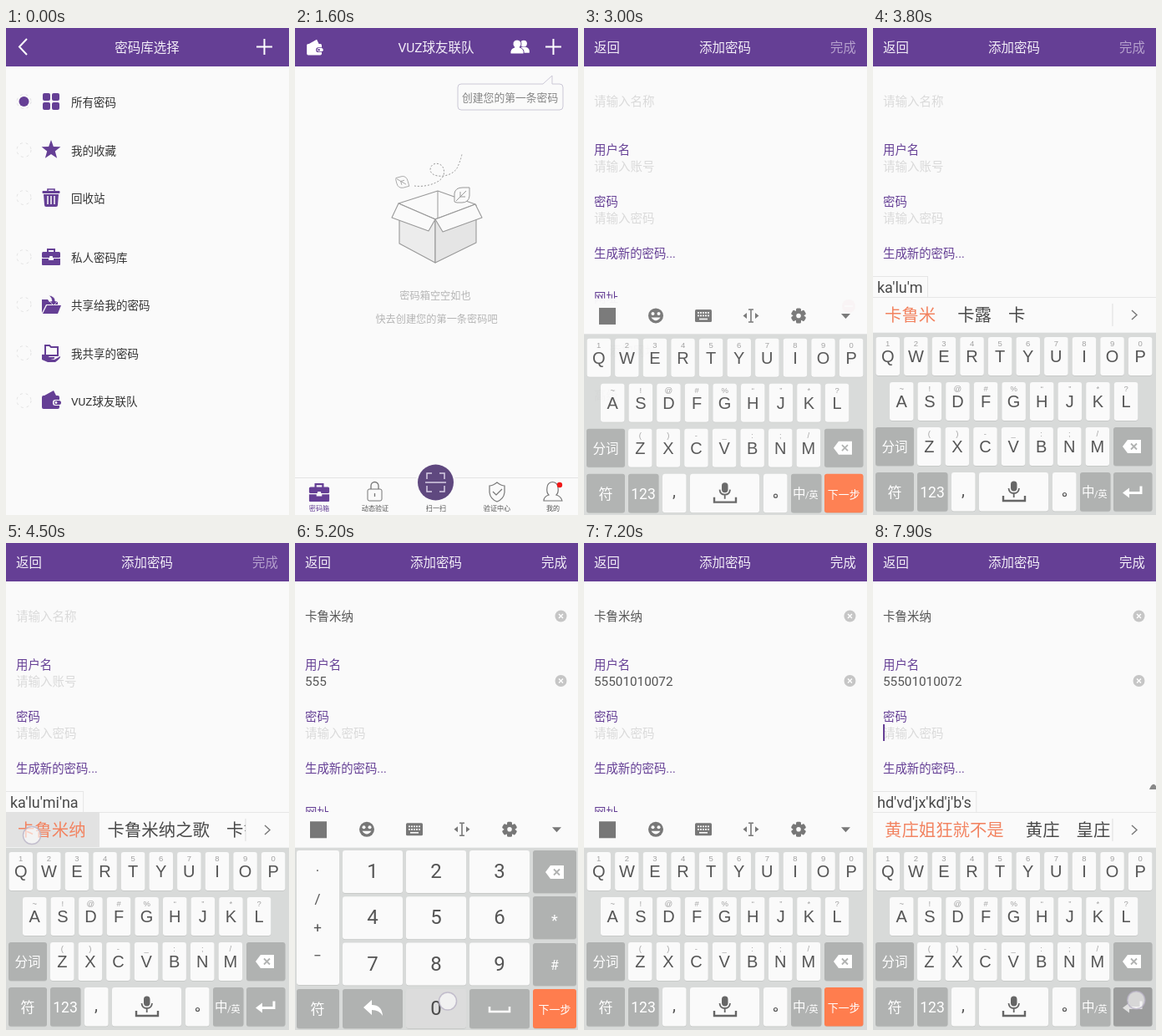
Animation of 339x583 px, one loop 8 s. Source, as an HTML page:

```html
<!DOCTYPE html>
<html lang="zh-CN">
<head>
<meta charset="utf-8">
<title>密码库</title>
<style>
html, body { margin: 0; width: 100%; height: 100%; overflow: hidden; background: #fafafa; }
svg { display: block; width: 100vw; height: 100vh; }
text { font-family: Roboto, "Noto Sans CJK SC", sans-serif; white-space: pre; }
.caps text { font-family: "Liberation Sans", sans-serif; }
</style>
</head>
<body>
<svg id="stage" viewBox="0 0 339 583"></svg>
<script>
const LOOP = 8000, STEP = 100;
const PURPLE = '#653f95', PAPER = '#fafafa', INK = '#555', GREY = '#b0b2b1', ORANGE = '#ff7d4e';
const TEAM = 'VUZ球友联队', NAME = '卡鲁米纳', ACCOUNT = '55501010072';

const clamp = v => Math.max(0, Math.min(1, v));
const easeOut = p => 1 - (1 - p) ** 2;

// Text is placed by its vertical centre.
const text = (x, y, str, size, fill, anchor = 'start') =>
  `<text x="${x}" y="${y + size * .38}" font-size="${size}" fill="${fill}" text-anchor="${anchor}">${str}</text>`;
const mid = (x, y, str, size, fill) => text(x, y, str, size, fill, 'middle');
const rect = (x, y, w, h, fill, r = 0, extra = '') =>
  `<rect x="${x}" y="${y}" width="${w}" height="${h}" rx="${r}" fill="${fill}" ${extra}/>`;
const circle = (x, y, r, fill, extra = '') => `<circle cx="${x}" cy="${y}" r="${r}" fill="${fill}" ${extra}/>`;
const shape = (d, fill, extra = '') => `<path d="${d}" fill="${fill}" ${extra}/>`;
const line = (d, stroke, w = 1, extra = '') =>
  `<path d="${d}" fill="none" stroke="${stroke}" stroke-width="${w}" ${extra}/>`;
const at = (x, y, body, extra = '') => `<g transform="translate(${x} ${y}) ${extra}">${body}</g>`;
const header = title => rect(0, 0, 339, 46, PURPLE) + mid(169, 23, title, 15.5, '#f3eef8');
const plus = line('M300 22.5H319M309.5 13V32', '#fff', 2);

const ruler = document.createElement('canvas').getContext('2d');
const textWidth = (str, size) => {
  ruler.font = `${size}px Roboto, sans-serif`;
  return ruler.measureText(str).width;
};

const icon = {
  grid: c => [[-10, -10], [1, -10], [-10, 1], [1, 1]].map(([x, y]) => rect(x, y, 9, 9, c, 2)).join(''),
  star: c => {
    const points = Array.from({ length: 10 }, (_, i) => {
      const r = i % 2 ? 5 : 12, a = i * Math.PI / 5;
      return `${(r * Math.sin(a)).toFixed(1)},${(-r * Math.cos(a)).toFixed(1)}`;
    });
    return `<polygon points="${points.join(' ')}" fill="${c}"/>`;
  },
  bin: c => line('M-4-7V-10H4V-7', c, 1.6) + rect(-10.5, -8, 21, 3, c, 1) +
    shape('M-9-4H9L8 9Q8 11 6 11H-6Q-8 11-8 9Z', c) + line('M-4-2V8M0-2V8M4-2V8', PAPER, 1.5),
  bag: c => line('M-4-5V-9H4V-5', c, 2) + rect(-11, -6, 22, 7, c, 1.5) +
    shape('M-11 2H-3V4H3V2H11V9Q11 10 10 10H-10Q-11 10-11 9Z', c) + rect(-2, -1, 4, 4, PAPER, 1),
  shared: c => shape('M-11 10V-6H-4L-2-3H8V0H-6Z', c) + shape('M-5 1H12L8 11H-10Z', c) +
    shape('M-3-11Q5-10 5-4H8L3 1-2-4H1Q1-8-3-11Z', c, `stroke="${PAPER}" stroke-width=".7"`),
  give: c => line('M-7 3V-9H-2L0-7H8V3Z', c, 2) +
    shape('M-11 2Q-6 1-2 5H4Q5 7 2 7H-1L4 8 11 4Q12 6 5 11H-4L-11 8Z', c),
  wallet: (c, hole = PAPER) => shape('M-8-6L3-12 6-6Z', c) + rect(-11, -6, 21, 16, c, 2) +
    rect(2, -1, 10, 7, hole, 3) + rect(3.5, 0, 8.5, 5, c, 2.5) + circle(6, 2.5, 1.4, hole),
};

const rows = [
  [88, 'grid', '所有密码'], [146, 'star', '我的收藏'], [203, 'bin', '回收站'], [274, 'bag', '私人密码库'],
  [331, 'shared', '共享给我的密码'], [389, 'give', '我共享的密码'], [446, 'wallet', TEAM],
];
const listPage = rect(0, 0, 339, 583, PAPER) + header('密码库选择') + plus +
  line('M25 13L16 22.5 25 32', '#fff', 2) + circle(21.5, 88, 6, PURPLE) +
  rows.map(([y, name, label]) =>
    circle(21.5, y, 8.5, 'none', 'stroke="#dcdcdc" stroke-width=".8" stroke-dasharray="3 4"') +
    at(54, y, icon[name](PURPLE)) + text(78, y + .5, label, 13.5, '#333')).join('');

const person = c => circle(0, -4, 4.6, c) + shape('M-8 9Q-9 3-3 1H3Q9 3 8 9Z', c);
const leaf = shape('M-9 8V-2Q-8-9 1-9H9V1Q8 9 0 9H-6Z', PAPER, 'stroke="#999"') +
  line('M-7 7L5-5M-2 2V-4M-2 2H4', '#999');
const tabs = [[29, '密码箱', PURPLE], [96, '动态验证', INK], [169, '扫一扫', INK], [242, '验证中心', INK], [309, '我的', INK]];
const mainPage = rect(0, 0, 339, 583, PAPER) + header(TEAM) + plus +
  at(23.5, 24, icon.wallet('#fff', PURPLE), 'scale(.85)') +
  at(274, 22, person('#fff'), 'scale(.85)') +
  at(266, 22, shape('M-8 9Q-9 3-3 1A5 5 0 1 1 3 1Q9 3 8 9Z', '#fff', `stroke="${PURPLE}"`)) +
  shape('M199 67H297L308 57V67H317Q321 67 321 71V94Q321 98 317 98H199Q195 98 195 94V71Q195 67 199 67Z',
    PAPER, 'stroke="#cbc8d6"') +
  text(200, 83, '创建您的第一条密码', 12.8, '#858585') +
  `<g stroke="#999" stroke-width="1.1" stroke-linejoin="round">` +
  shape('M124 210L171 195 216 211 168 229Z', PAPER) + line('M171 195V228', '#999') +
  shape('M125 212L168 229V281L125 258Z', '#ececec') + shape('M168 229L217 212V257L168 281Z', '#e5e5e5') +
  shape('M124 210L116 227 160 243 168 229Z', PAPER) + shape('M168 229L177 244 224 227 216 211Z', PAPER) + '</g>' +
  line('M143 189C155 191 175 186 178 176C182 160 162 158 162 170C163 180 186 180 194 168Q198 160 200 151',
    '#999', 1, 'stroke-dasharray="2 2"') +
  at(128.5, 184.5, leaf, 'rotate(75) scale(.75)') + at(200, 200, leaf) +
  mid(168, 320, '密码箱空空如也', 12.2, '#b5b5b5') + mid(169.5, 348, '快去创建您的第一条密码吧', 12.2, '#b5b5b5') +
  line('M0 538.5H339', '#e4e4e4') + circle(168.5, 545, 24, PAPER) + circle(168.5, 544, 21.5, '#5f487f') +
  line('M158 540V533H164M173 533H179V540M179 548V555H173M164 555H158V548M156 544H181', '#d8cde5', 1.5) +
  at(29, 556, icon.bag(PURPLE), 'scale(1.1)') +
  rect(87, 552, 17, 14, 'none', 2, 'stroke="#777"') + line('M91 552V548A4.5 4.5 0 0 1 100 548V552M95.5 557V561', '#777', 1.3) +
  line('M242 544Q247 548 251 548V556Q250 564 242 567Q234 564 233 556V548Q237 548 242 544ZM237 555L241 559 248 552', '#777', 1.2) +
  line('M298 566Q298 561 304 559Q301 556 302 550A6.5 6.5 0 0 1 315 550Q316 556 313 559Q319 561 320 566Z', '#777', 1.2) +
  circle(317, 547, 3.2, '#f01818') + tabs.map(([x, label, c]) => mid(x, 575, label, 8.1, c)).join('');

const clearMark = y => circle(318.5, y, 7, '#c6c6c6') + line(`M316 ${y - 2.5}l5 5m0-5l-5 5`, '#fff', 1.4);
const field = (y, value, hint, size = 14.5) =>
  text(12, y, value || hint, value ? size : 14.5, value ? INK : '#dadada') + (value ? clearMark(y) : '');
const formPage = (name, account) => rect(0, 0, 339, 583, PAPER) + header('添加密码') +
  text(12, 23, '返回', 15.4, '#f3eef8') + text(295, 23, '完成', 15.4, name ? '#f3eef8' : '#b5a0cd') +
  field(87.5, name, '请输入名称') + text(12, 145.3, '用户名', 14.4, PURPLE) + field(165, account, '请输入账号', 15.3) +
  text(12, 207.3, '密码', 14.4, PURPLE) + field(227.3, '', '请输入密码') +
  text(12, 269.3, '生成新的密码...', 14.4, PURPLE) + text(12, 323, '网址', 14.4, PURPLE) +
  circle(317, 333, 8, '#f0606c') + line('M312 333H322', '#fff', 2) +
  text(30, 387, '添加网址', 14.4, '#999') + text(12, 440, '高级', 14.4, '#999');

// Keyboard geometry
const qwerty = {};
[['QWERTYUIOP', '1234567890', 3.5, 370], ['ASDFGHJKL', '~!@#%“”*?', 20, 424], ['ZXCVBNM', '()-_:;/', 53, 478]]
  .forEach(([letters, hints, x, y]) => [...letters].forEach((k, i) =>
    qwerty[k] = { x: x + 33.6 * i, y, w: 28.5, h: 46, hint: hints[i] }));
const nextKey = { x: 288, y: 532, w: 46.5, h: 46.5 };
const padNext = { x: 285, y: 534, w: 52, h: 47 };
const pad = { 0: { x: 133, y: 534, w: 72, h: 47 } };
for (let n = 1; n < 10; n++)
  pad[n] = { x: 57 + 76 * ((n - 1) % 3), y: 368 + 55.3 * Math.floor((n - 1) / 3), w: 72, h: 51 };

const keyCap = (k, fill = PAPER) => rect(k.x, k.y + .7, k.w, k.h, '#c3c5c4', 3) + rect(k.x, k.y, k.w, k.h, fill, 3);
const box = (x, y, w, h) => ({ x, y, w, h });
const backspace = (x, y) => at(x, y, shape('M-11 0L-5-8H11V8H-5Z', '#fff') + line('M-1-3.5l7 7m0-7l-7 7', GREY, 1.8));
const keyboardBase = rect(0, 364.5, 339, 240, '#d8dad9');

const letterKeys = Object.entries(qwerty).map(([name, k]) => {
  const cx = k.x + k.w / 2;
  return keyCap(k) + mid(cx, k.y + 7.8, k.hint, 9.5, '#a2a2a2') + mid(cx, k.y + 22.8, name, 20, INK);
}).join('');
const letterBoard = keyboardBase + `<g class="caps">${letterKeys}</g>` +
  keyCap(box(3, 478, 46, 46), GREY) + mid(26, 501.5, '分词', 15.5, '#fff') +
  keyCap(box(288, 478, 46.5, 46), GREY) + backspace(310, 501) +
  keyCap(box(3, 532, 46, 46.5), GREY) + mid(26, 555.5, '符', 17, '#fff') +
  keyCap(box(53, 532, 36.5, 46.5), GREY) + mid(71, 555.5, '123', 17.5, '#fff') +
  keyCap(box(94, 532, 28.5, 46.5)) + mid(108, 552, ',', 20, INK) +
  keyCap(box(127, 532, 83, 46.5)) + rect(165, 542.5, 7.5, 12, '#666', 3.7) +
  line('M162.5 551Q163 557 168.7 557T175 551M168.7 557V562', '#666', 1.8) + line('M156 560V566H182V560', '#666', 2.4) +
  keyCap(box(215, 532, 28.5, 46.5)) + circle(229.5, 558.5, 2, 'none', `stroke="${INK}" stroke-width="1.2"`) +
  keyCap(box(248, 532, 36.5, 46.5), GREY) + text(250, 555.5, '中', 15.5, '#fff') + text(265, 557.5, '/英', 11, '#fff');

const numberBoard = keyboardBase + keyCap(box(2, 368, 51, 161)) +
  ['·', '/', '+', '−'].map((s, i) => mid(27, 392 + 34 * i, s, 17, INK)).join('') +
  Object.entries(pad).map(([n, k]) => keyCap(k) + mid(k.x + 36, k.y + k.h / 2 - 1.5, n, 24, INK)).join('') +
  keyCap(box(285, 368, 52, 51), GREY) + backspace(311, 394) +
  keyCap(box(285, 423, 52, 51), GREY) + mid(311, 451, '*', 18, '#fff') +
  keyCap(box(285, 479, 52, 51), GREY) + mid(311, 505, '#', 16, '#fff') +
  keyCap(box(2, 534, 51, 47), GREY) + mid(27, 558, '符', 17, '#fff') +
  keyCap(box(57, 534, 72, 47), GREY) + shape('M82 556L92 547V553Q104 553 105 566Q101 559 92 559V565Z', '#fff') +
  keyCap(box(209, 534, 72, 47), GREY) + line('M233 555V561H257V555', '#fff', 2.5);

const nextCap = k => keyCap(k, ORANGE) + mid(k.x + k.w / 2, k.y + 24, '下一步', 13, '#fff');
const enterCap = keyCap(nextKey, GREY) + line('M321 548.5V556.5H304', '#fff', 3) + shape('M299 556.5L307 550.5V562.5Z', '#fff');

const gear = Array.from({ length: 6 }, (_, i) => rect(-3, -9, 6, 6, '#777', 1.5, `transform="rotate(${i * 60})"`)).join('');
const tools = rect(18, 334, 20, 20, '#777') +
  circle(86, 343.5, 9, '#777') + circle(82.5, 341, 2, PAPER) + circle(89.5, 341, 2, PAPER) + shape('M80.5 345.5H91.5Q86 353 80.5 345.5Z', PAPER) +
  rect(133, 336, 20, 15, '#777', 1.5) + line('M136 340H150M136 343.5H150', PAPER, 1.8, 'stroke-dasharray="2 1"') + line('M138 347.5H148', PAPER, 1.6) +
  line('M197 336H203M200 336V351M197 351H203', '#777', 1.6) + shape('M195 340V347L190.5 343.5ZM205 340V347L209.5 343.5Z', '#777') +
  at(257, 343.5, gear + circle(0, 0, 6.5, '#777') + circle(0, 0, 2.8, PAPER)) + shape('M308 341H319L313.5 347Z', '#777');
const toolbar = rect(0, 322, 339, 42.5, PAPER) + at(0, -.7, tools);

function candidateBar(pinyin, words, pressed) {
  const size = 20.4, pinyinSize = 18;
  let x = 14, list = '';
  words.forEach((word, i) => {
    list += text(x, 343.5, word, size, i ? '#484848' : '#f28360');
    x += word.length * size + (i ? 20 : 26);
  });
  return rect(0, 322, 339, 42.5, PAPER) + line('M0 322.5H339', '#e6e6e6') +
    rect(-1, 297.5, 12 + textWidth(pinyin, pinyinSize), 25, PAPER, 0, 'stroke="#e6e6e6"') +
    text(5, 310.5, pinyin, pinyinSize, '#484848') +
    (pressed ? rect(0, 322, 112, 42, '#e2e2e2') : '') +
    `<svg x="0" y="322" width="287" height="43" viewBox="0 322 287 43">${list}</svg>` +
    line('M287 330V357', '#ddd') + line('M310 338L316 343.5 310 349', '#777', 1.4);
}

// Touches: time, position, pressed key, duration
const taps = [];
const tap = (t, x, y, key, ms = 100) => taps.push({ t, x, y, key, ms });
const tapKey = (t, k, dx = 5, dy = -7, ms = 100) => tap(t, k.x + k.w / 2 + dx, k.y + k.h / 2 + dy, k, ms);

const nameEntry = {
  start: 3100, gap: 150, end: 4600, pinyin: "ka'lu'mi'na", word: NAME,
  more: [['咖', '喀'], ['卡路', '卡'], ['卡露', '卡'], [NAME + '之歌', '卡鲁']],
};
const secretEntry = {
  start: 7250, gap: 50, end: LOOP, pinyin: "hd'vd'jx'kd'j'b's", word: '黄庄姐狂就不是',
  more: [['好的', '活动'], ['黄庄', '皇庄']],
};
for (const e of [nameEntry, secretEntry])
  [...e.pinyin.replace(/'/g, '')].forEach((c, i) => tapKey(e.start + i * e.gap, qwerty[c.toUpperCase()]));
const digitTime = i => i < 9 ? 4900 + 100 * i : i === 9 ? 5800 : 6200;
tap(500, 167, 443);
tap(1800, 311, 23, null, 200);
tap(4400, 31, 350, null, 200);
tapKey(4700, nextKey);
[...ACCOUNT].forEach((n, i) => tapKey(digitTime(i), pad[n], 14, -9));
tapKey(6700, padNext);
tapKey(7800, nextKey, 4, -8, 200);

function composing(e, t) {
  if (t < e.start || t >= e.end) return '';
  const count = Math.floor((t - e.start) / e.gap) + 1;
  let letters = 0, typed = '';
  for (const c of e.pinyin) {
    if (c !== "'" && ++letters > count) break;
    typed += c;
  }
  typed = typed.replace(/'$/, '');
  const syllables = typed.split("'").length;
  const more = e.more[Math.min(syllables, e.more.length) - 1];
  return candidateBar(typed, [e.word.slice(0, syllables), ...more], e === nameEntry && t >= 4400);
}

const accountAt = t => [...ACCOUNT].filter((_, i) => t >= digitTime(i) + 100).join('');

function caret(t) {
  if (t < 4800 || Math.floor(t / 500) % 2 === 0) return '';
  return t < 6900 ? rect(12 + textWidth(accountAt(t), 15.3), 155, 2, 20, PURPLE) : rect(12, 217, 2, 20, PURPLE);
}

function keyboard(t, touch) {
  const p = clamp((t - 2700) / 360);
  if (!p) return '';
  const numeric = t >= 4900 && t < 6900;
  const bar = composing(nameEntry, t) || composing(secretEntry, t);
  return `<g opacity="${easeOut(p) * .95 + p * .05}" transform="translate(0 ${60 * (1 - p) ** 2})">` +
    (numeric ? numberBoard + nextCap(padNext) : letterBoard + (bar ? enterCap : nextCap(nextKey))) +
    (bar || toolbar) + (bar && t > 7200 ? shape('M331 295Q335 285 339 291V295Z', '#888') : '') +
    (touch && touch.key ? rect(touch.key.x, touch.key.y, touch.key.w, touch.key.h, '#000', 3, 'opacity=".12"') : '') + '</g>';
}

function scene(t) {
  const touch = taps.filter(k => t >= k.t && t < k.t + k.ms || Math.ceil(k.t / STEP) * STEP === t).pop();
  const leave = easeOut(clamp((t - 800) / 400)), enter = easeOut(clamp((t - 2000) / 400));
  let out = '';
  if (enter < 1) out += mainPage;
  if (leave < 1) out += at(339 * leave, 0, listPage);
  if (enter > 0) out += at(339 * (1 - enter), 0, formPage(t >= 4600 ? NAME : '', accountAt(t)) + caret(t));
  out += keyboard(t, touch);
  if (touch) out += circle(touch.x, touch.y, 10.5, '#fff', 'fill-opacity=".6" stroke="#b9b3c6" stroke-opacity=".8" stroke-width="1.5"');
  return out;
}

const stage = document.getElementById('stage');
const begin = performance.now();
let shown = -1;
function play() {
  const t = Math.floor((performance.now() - begin) % LOOP / STEP) * STEP;
  if (t !== shown) stage.innerHTML = scene(shown = t);
  requestAnimationFrame(play);
}
play();
</script>
</body>
</html>
```
